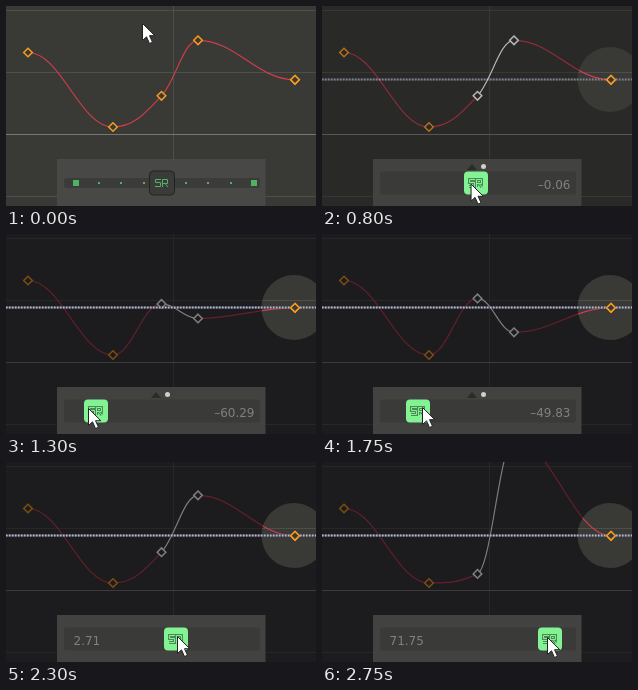
An HTML page for the animation above (3100 ms loop, 310 by 200 pixels).

```html
<!DOCTYPE html>
<html>
<head>
<meta charset="utf-8">
<style>
html, body { margin: 0; width: 100%; height: 100%; overflow: hidden; background: #393936; }
svg { display: block; width: 310px; height: 200px; }
.grid { stroke: #4e4e4b; }
.axis { stroke: #767673; }
.curve { fill: none; stroke: #cf3c4b; stroke-width: 1.15; }
.curve.sel { stroke: #fff; }
.key { fill: #393936; stroke: #f79c1e; stroke-width: 1.5; }
.key.sel { stroke: #fff; }
.value { font: 12px "DejaVu Sans", sans-serif; fill: #80807d; }
.glyph { fill: none; }
</style>
</head>
<body>
<svg viewBox="0 0 310 200">
  <rect width="310" height="200" fill="#393936"/>
  <path class="grid" d="M0 4.5H310M0 66.5H310M0 190.5H310M167.5 0V200"/>
  <path class="axis" d="M0 128.5H310"/>
  <g id="curves"></g>
  <g id="keys"></g>
  <g id="dim">
    <path d="M0 0H310V200H0ZM255.500 73.500a32.500 32.500 0 1 0 65 0a32.500 32.500 0 1 0 -65 0Z" fill="#000007" fill-rule="evenodd" opacity=".5"/>
    <path d="M0 73.500H310" stroke="#55586e" stroke-width="2"/>
    <path d="M0 73.500H310" stroke="#b4b6c8" stroke-width="2" stroke-dasharray="1.500 1.500"/>
  </g>
  <path class="key" d="M289 69.500l4.300 4.300l-4.300 4.300l-4.300-4.300z"/>

  <rect id="panel" x="51" y="153" width="208.500" height="47"/>
  <g id="idle">
    <rect x="58" y="172" width="196" height="10" rx="3" fill="#3b3b39"/>
    <path d="M67 174h6v6h-6zM245 174h6v6h-6z" fill="#4fb262"/>
    <path d="M92 177h2M114 177h2M137 177h2M179 177h2M201 177h2M224 177h2" stroke="#4fb262" stroke-width="2"/>
    <rect x="143.500" y="165" width="25" height="24" rx="4" fill="#3b3b39" stroke="#222220"/>
    <use href="#glyph" x="156" stroke="#4fb262"/>
  </g>
  <g id="active">
    <rect x="58" y="165.500" width="196" height="23" rx="3" fill="#3a3a38"/>
    <text id="value" class="value" y="182.500"></text>
    <g id="mark">
      <path d="M145 164l5-6l5 6z" fill="#2b2b29"/>
      <circle cx="161.500" cy="160.500" r="2.500" fill="#cfcfcc"/>
    </g>
    <g id="button">
      <rect x="-12" y="165.500" width="24" height="23" rx="4" fill="#83f292"/>
      <use href="#glyph" stroke="#4a8a55" stroke-width="3"/>
      <use href="#glyph" stroke="#83f292"/>
    </g>
  </g>
  <defs>
    <path id="glyph" class="glyph" d="M-1 173.500H-6.500V176.500H-1.500V180.500H-7M.5 181V173.500H5.500V177.500H.5M3 177.500L6 181"/>
  </defs>
  <path id="cursor" d="M0 0V17L4 13.300L7 20L10 18.700L7 12.200H12.300Z"/>
</svg>
<script>
const $ = id => document.getElementById(id);
const LOOP = 3100, STEP = 50, HANDLE = 0.39;

// Auto-clamped tangents: flat at ends and extrema
function slopes(p) {
  const rise = i => (p[i + 1][1] - p[i][1]) / (p[i + 1][0] - p[i][0]);
  return p.map((_, i) => {
    if (!i || i === p.length - 1) return 0;
    const a = rise(i - 1), b = rise(i);
    if (a * b <= 0) return 0;
    const max = Math.min(Math.abs(a), Math.abs(b)) / HANDLE;
    return Math.sign(a) * Math.min(Math.abs(a + b) / 2, max);
  });
}

function track(p) {
  const m = slopes(p);
  return t => {
    if (t <= p[0][0]) return p[0][1];
    const i = p.findIndex(k => k[0] >= t) - 1;
    if (i < 0) return p[p.length - 1][1];
    const [x0, y0] = p[i], [x1, y1] = p[i + 1];
    const w = x1 - x0, u = (t - x0) / w, v = 1 - u;
    return v * v * ((1 + 2 * u) * y0 + u * w * m[i])
         + u * u * ((1 + 2 * v) * y1 - v * w * m[i + 1]);
  };
}

const cursorX = track([[0, 136], [420, 155], [700, 155], [950, 134.6], [1000, 134],
  [1050, 119], [1200, 89.5], [1250, 89], [1300, 82], [1480, 71], [1600, 74],
  [1650, 81], [1700, 95], [1750, 100], [2250, 169], [2300, 171], [2500, 205],
  [2650, 224], [2700, 227], [2750, 225]]);
const cursorY = track([[0, 17], [420, 181], [620, 181], [1050, 172], [1300, 174],
  [1750, 173], [2300, 174], [2750, 175]]);

const offset = t => Math.max(-85, Math.min(85, cursorX(t) - 155));
const percent = d => Math.sign(d) * (d / 8.5) ** 2;

function add(parent, cls) {
  const el = document.createElementNS("http://www.w3.org/2000/svg", "path");
  el.setAttribute("class", cls);
  return $(parent).appendChild(el);
}
const segs = Array.from({ length: 4 }, () => add("curves", "curve"));
const keys = Array.from({ length: 5 }, () => add("keys", "key"));

function drawCurve(v, selected) {
  const p = [[22, 46.5], [107, 121], [155.5, 89.8 + 0.335 * v],
    [192, 34.3 - 0.845 * v], [289, 73.8]];
  const m = slopes(p);
  segs.forEach((el, i) => {
    const [x0, y0] = p[i], [x1, y1] = p[i + 1], h = (x1 - x0) * HANDLE;
    el.setAttribute("d", `M${x0} ${y0}C${x0 + h} ${y0 + h * m[i]} ${x1 - h} ${y1 - h * m[i + 1]} ${x1} ${y1}`);
    el.classList.toggle("sel", selected && i === 2);
  });
  keys.forEach((el, i) => {
    el.setAttribute("d", `M${p[i][0]} ${p[i][1] - 4.3}l4.3 4.3l-4.3 4.3l-4.3-4.3z`);
    el.classList.toggle("sel", selected && (i === 2 || i === 3));
  });
}

const show = (id, on) => { $(id).style.display = on ? "" : "none"; };

function draw(t) {
  const hover = t >= 350, pressed = t >= 650;
  const d = pressed ? Math.round(offset(t - 50)) : 0;
  const v = percent(d);

  // The curve trails the slider by one more step
  drawCurve(pressed ? percent(offset(t - 100)) : 0, hover);
  $("dim").setAttribute("opacity", Math.max(0, Math.min(1, (t - 550) / 450)));

  $("panel").setAttribute("fill", pressed ? "#424240" : "#484846");
  show("idle", !pressed);
  show("active", pressed);
  show("mark", v < 0);

  const text = $("value");
  text.textContent = (v < 0 ? "–" : "") + Math.abs(v).toFixed(2);
  text.setAttribute("x", v < 0 ? 248.5 : 67.5);
  text.setAttribute("text-anchor", v < 0 ? "end" : "start");
  $("button").setAttribute("transform", `translate(${156 + d} 0)`);

  const dark = hover && !pressed;
  const cursor = $("cursor");
  cursor.setAttribute("transform", `translate(${cursorX(t) + 0.5} ${cursorY(t) + 0.5})`);
  cursor.setAttribute("fill", dark ? "#111" : "#fff");
  cursor.setAttribute("stroke", dark ? "#ddd" : "#222");
}

function tick() {
  const t = performance.now() % LOOP;
  draw(Math.min(2750, Math.floor(t / STEP) * STEP));
  requestAnimationFrame(tick);
}
tick();
</script>
</body>
</html>
```
